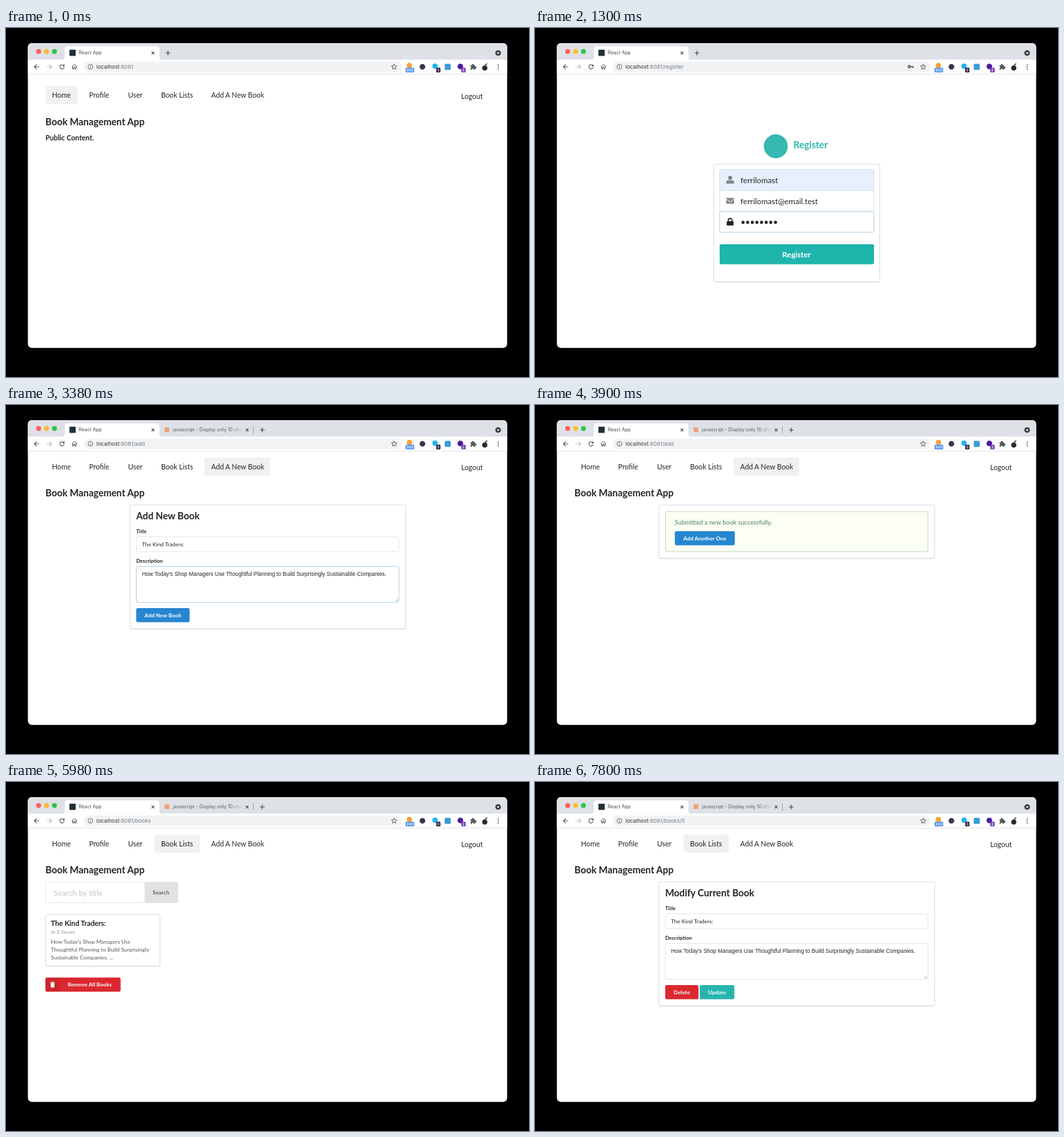
Write an HTML page that moves like this. It is 796x531 px and loops after 8000 ms.

```html
<!DOCTYPE html>
<html lang="en">
<head>
<meta charset="utf-8">
<title>Book Management App</title>
<style>
html, body { margin: 0; height: 100%; overflow: hidden; background: #000; }
svg { display: block; width: 796px; height: 531px; }
text { white-space: pre; }
</style>
</head>
<body>
<svg id="stage" viewBox="0 0 796 531"></svg>
<script>
const STEP = 1300, LOOP = 8000;
const INK = '#232425', TEAL = '#1fb5ad', BLUE = '#2786d0', RED = '#db2830', LINE = '#dededf', FOCUS = '#9cc3de';
const LATO = 'Lato, sans-serif', UI = 'Inter, sans-serif', ARIAL = 'Liberation Sans, Arial, sans-serif';

const USER = 'ferrilomast', MAIL = USER + '@email.test', BOOK = 'The Kind Traders:';
const BLURB = ["How Today's Shop Managers Use", 'Thoughtful Planning to Build Surprisingly', 'Sustainable Companies.'];

// y is the middle of the capital letters
const text = (x, y, str, size, { fill = INK, bold = 400, font = LATO, anchor = 'start' } = {}) =>
  `<text x="${x}" y="${y + size * .36}" font-size="${size}" fill="${fill}" font-weight="${bold}" font-family="${font}" text-anchor="${anchor}">${str}</text>`;
const bold = (x, y, str, size, fill = INK) => text(x, y, str, size, { fill, bold: 700 });
const ui = (x, y, str, size, fill = '#45494d') => text(x, y, str, size, { fill, font: UI });
const box = (x, y, w, h, fill, r = 0, stroke = 'none') =>
  `<rect x="${x}" y="${y}" width="${w}" height="${h}" rx="${r}" fill="${fill}" stroke="${stroke}" stroke-width=".8"/>`;
const dot = (x, y, r, fill) => `<circle cx="${x}" cy="${y}" r="${r}" fill="${fill}"/>`;
const line = (x, y, d, color = '#505357', width = 1.1) =>
  `<path transform="translate(${x} ${y})" d="${d}" fill="none" stroke="${color}" stroke-width="${width}"/>`;
const solid = (x, y, d, color) => `<path transform="translate(${x} ${y})" d="${d}" fill="${color}" fill-rule="evenodd"/>`;
const panel = (x, y, w, h) =>
  box(x - .4, y + .6, w + .8, h + 1, '#0001', 3) + box(x, y, w, h, '#fff', 2.4, '#d4d4d5');
const button = (x, y, w, label, fill) => box(x, y, w, 21.6, fill, 2.4) +
  text(x + w / 2, y + 10.8, label, 8.4, { fill: '#fff', bold: 700, anchor: 'middle' });

const CROSS = 'M-2 -2L2 2M2 -2L-2 2', PLUS = 'M-3.6 0H3.6M0 -3.6V3.6';
const TRASH = 'M-3.4 -4H-1.2L-.7 -4.6H.7L1.2 -4H3.4V-3H-3.4ZM-3 -2.4H3L2.6 4.4H-2.6Z';

function badge(x, y, w, str, fill) {
  return box(x - w / 2, y - 3.5, w, 7, fill, 1.2) +
    text(x, y, str, 5.4, { fill: '#fff', bold: 600, font: UI, anchor: 'middle' });
}

function browser(path, twoTabs, hasKey) {
  const star = Array.from({ length: 10 }, (_, i) => {
    const r = i % 2 ? 1.9 : 4.3, a = i * Math.PI / 5;
    return (r * Math.sin(a)).toFixed(2) + ' ' + (-r * Math.cos(a)).toFixed(2);
  }).join('L');
  let s = box(33, 23, 730, 25.5, '#dee1e6') + box(33, 48, 730, 22, '#fff') + box(33, 69.7, 730, .8, '#d9dbde');
  s += dot(49.7, 35.8, 3.7, '#fe5f57') + dot(61.7, 35.8, 3.7, '#febc2e') + dot(73.7, 35.8, 3.7, '#28c840');
  s += solid(0, 0, 'M85 48.5Q89.500 48.500 89.500 44V32.500Q89.500 28 94 28H229Q233.500 28 233.500 32.500V44Q233.500 48.500 238 48.500Z', '#fff');
  s += box(96.500, 33, 9.600, 9.600, '#20303a', 1) + ui(110.700, 37.900, 'React App', 7.200) + line(223.700, 38, CROSS);
  if (twoTabs) {
    s += box(241.500, 34, 7, 7, '#f0a073') + ui(254, 37.900, 'javascript - Display only 10 cha', 7.200, 'url(#fade)') +
      line(367, 38, CROSS) + box(376, 32.500, .8, 11, '#8d9196');
  }
  s += line(twoTabs ? 390 : 246.500, 38, PLUS, '#45494d', 1.200);
  s += dot(749, 38, 4.300, '#3d4043') + solid(749, 38.300, 'M-2 -1.200H2L0 1.600Z', '#fff');

  const arrow = 'M3.800 0H-3.400M0 -3.600L-3.600 0L0 3.600';
  s += line(46.800, 59, arrow) + `<g transform="translate(132.600 0) scale(-1 1)">${line(66.600, 59, arrow, '#bcbfc3')}</g>`;
  s += line(85.300, 59, 'M2.600 -2A3.300 3.300 0 1 0 3.200 .900') + solid(85.300, 59, 'M3.800 -4V-.4H.2Z', '#505357');
  s += line(104.200, 59, 'M-4 .2L0 -3.600L4 .2M-2.700 -.6V3.400H-.9V.7H.9V3.400H2.700V-.6', '#505357', 1);
  s += box(118, 51, 484, 16.400, '#f1f3f4', 8.200);
  s += line(128.500, 59, 'M-3.700 0A3.700 3.700 0 1 0 3.700 0A3.700 3.700 0 1 0 -3.700 0M0 -2.100V-1M0 -.4V2.200', '#5f6368', .9);
  s += `<text x="137.700" y="61.900" font-size="8.200" font-family="${UI}" fill="#777b80"><tspan fill="#303336">localhost</tspan>:8081${path}</text>`;
  if (hasKey) s += dot(569.700, 58.800, 2.500, '#505357') + dot(569.700, 58.800, .9, '#fff') + solid(572, 58.800, 'M0 -.8H4.200V2H2.600V.8H0Z', '#505357');
  s += line(590.800, 59.200, `M${star}Z`, '#505357', .9);

  s += dot(614, 57, 4, '#f6a13a') + badge(614.700, 64, 13, '999', '#4a8df0');
  s += dot(633.800, 59, 4.300, '#343a4d');
  s += dot(653, 58, 4, '#1fb5ec') + badge(658, 64, 6.400, '0', '#2b1038');
  s += box(667.700, 54.500, 9.200, 9.200, '#3c9bd8', 1.500);
  s += dot(691.500, 58.500, 4.300, '#4a1c9c') + badge(696.300, 64, 6.800, '2', '#7a3bb5');
  s += solid(711, 59.300, 'M-4 -2.600H-1.700A1.500 1.500 0 1 1 1.100 -2.600H3V-.6A1.500 1.500 0 1 1 3 2.200V4.200H.9A1.400 1.400 0 0 0 -1.900 4.200H-4V2.100A1.400 1.400 0 0 0 -4 -.6Z', '#55585c');
  s += dot(728.700, 60.800, 3.900, '#292929') + line(729.500, 58, 'M0 0Q.5 -3.500 3 -3.500', '#444', 1.500);
  for (const y of [55.800, 59, 62.200]) s += dot(749.200, y, .9, '#505357');
  return s;
}

function header(active, dy = 0) {
  const items = [['Home', 60, 49], ['Profile', 116.500, 51.500], ['User', 175.800, 42.500], ['Book Lists', 226, 69], ['Add A New Book', 302.200, 99.700]];
  return items.map(([label, x, w]) =>
    (label === active ? box(x, 79.900 + dy, w, 27.600, '#f1f1f1', 2.400) : '') + text(x + 10, 93.900 + dy, label, 10.800)).join('') +
    text(692.800, 95.600 + dy, 'Logout', 10.800) + bold(60, 134.200 + dy, 'Book Management App', 14.400);
}

function bookForm(title, border, buttons) {
  return panel(188.700, 152, 419.500, 188.500) + bold(198.200, 169.300, title, 14.400) +
    bold(198.200, 192, 'Title', 7.800) + box(198.400, 200.600, 399.600, 22.500, '#fff', 2.400, LINE) + text(207, 211.800, BOOK, 8.400) +
    bold(198.200, 237, 'Description', 7.800) + box(198.400, 245.600, 399.600, 54.800, '#fff', 2.400, border) +
    text(207, 257.400, BLURB.join(' '), 8.400, { font: ARIAL }) +
    line(596.600, 299, 'M-4 0L0 -4M-1.800 0L0 -1.800', '#8a8a8a', .7) + buttons;
}

function register() {
  const field = (y, fill, border) => box(281, y, 234.800, 31.600, fill, 2.400, border);
  let s = dot(366.500, 180, 18.200, '#35b9b1') + bold(393.200, 177.400, 'Register', 14.400, '#2cb7af');
  s += panel(272, 207.200, 252.700, 178.800);
  s += field(215.500, '#e8f0fd', '#c9d6e6') + field(247.300, '#fff', LINE) + field(279.200, '#fff', FOCUS);
  s += dot(297, 227.900, 3.100, '#858789') + solid(297, 231, 'M-6 5.800V3.600Q-6 .8 -3 .8H3Q6 .8 6 3.600V5.800Z', '#858789');
  s += box(291, 258.500, 12, 9, '#858789', 1.300) + line(297, 263, 'M-6 -2.600L0 1.600L6 -2.600', '#fff', 1);
  s += box(291.800, 294, 10.400, 6.600, INK, 1.200) + line(297, 294.500, 'M-2.700 0V-2.200A2.700 2.700 0 0 1 2.700 -2.200V0', INK, 1.700);
  s += text(312.800, 231.300, USER, 12) + text(312.800, 263.300, MAIL, 12);
  for (let i = 0; i < 8; i++) s += dot(316.600 + i * 7.050, 295.700, 2.450, INK);
  return s + box(281, 329, 235, 30.500, TEAL, 2.400) +
    text(398, 344.800, 'Register', 12, { fill: '#fff', bold: 700, anchor: 'middle' });
}

function gear(x, y, r) {
  return dot(x, y, r, '#3b3c3d') +
    `<circle cx="${x}" cy="${y}" r="${r}" fill="none" stroke="#3b3c3d" stroke-width="1.200" stroke-dasharray="${r * Math.PI / 8}"/>` +
    dot(x, y, r * .4, '#c0c1c2');
}

function bookList(hover) {
  const top = hover ? 199.500 : 201.700, footer = hover ? 332.400 : 297.500;
  let s = box(60.400, 152.200, 151, 31.500, '#fff', 2.400, LINE) + text(72.300, 168.400, 'Search by title', 12, { fill: '#c4c5c6' }) +
    box(211, 151.900, 51.200, 32, hover ? '#dcdddd' : '#e0e1e3', 2.400) + bold(223.300, 168, 'Search', 8.400, '#616263');
  s += panel(60, top, 174.400, hover ? 113.500 : 78.300) + bold(68.300, top + 13, BOOK, 10.800) +
    text(68.300, top + 26.200, 'in 2 hours', 8.400, { fill: '#9a9b9c' });
  [BLURB[0], BLURB[1], BLURB[2] + ' ...'].forEach((row, i) =>
    s += text(68.300, top + 41.600 + i * 11.600, row, 8.400, { fill: '#565758' }));
  if (hover) {
    s += box(60.400, 277.800, 173.600, .7, '#e9e9e9') + dot(79.300, 295.800, 10.800, '#c0c1c2') +
      gear(78, 295.800, 2.900) + gear(82.700, 293.600, 1.600) + gear(82.700, 298, 1.600);
    s += box(33, 473.500, 88, 14, '#dee1e6', 2) + ui(36.600, 480.300, 'localhost:8081/books/5', 7);
  }
  return s + box(60, footer, 114.500, 21.600, RED, 2.400) + box(60, footer, 21.600, 21.600, '#0001', 2.400) +
    solid(70.800, footer + 10.900, TRASH, '#fff') + bold(94, footer + 10.800, 'Remove All Books', 8.400, '#fff');
}

const scenes = [
  browser('') + header('Home', 8.400) + bold(60, 167, 'Public Content.', 10.800),
  browser('/register', false, true) + register(),
  browser('/add', true) + header('Add A New Book') +
    bookForm('Add New Book', FOCUS, button(198.200, 309, 81.300, 'Add New Book', BLUE)),
  browser('/add', true) + header('Add A New Book') + panel(188.700, 152, 419.500, 81) +
    box(198.700, 162.200, 399.300, 60.800, '#fcfff5', 2.400, '#b0cca2') +
    text(212.600, 178.200, 'Submitted a new book successfully.', 9.600, { fill: '#4f8350' }) +
    button(212.800, 191.900, 91.300, 'Add Another One', BLUE),
  browser('/books', true) + header('Book Lists') + bookList(false),
  browser('/books', true) + header('Book Lists') + bookList(true),
  browser('/books/5', true) + header('Book Lists') + bookForm('Modify Current Book', LINE,
    button(198.200, 309, 50.600, 'Delete', RED) + button(250.700, 309, 52.700, 'Update', '#26b5ae')),
];

document.getElementById('stage').innerHTML = `<defs>
  <clipPath id="window"><rect x="33.300" y="23" width="729.400" height="463.800" rx="6"/></clipPath>
  <linearGradient id="fade" gradientUnits="userSpaceOnUse" x1="342" x2="361"><stop stop-color="#555a5e"/><stop offset="1" stop-color="#555a5e" stop-opacity="0"/></linearGradient>
</defs><g clip-path="url(#window)">${box(33, 23, 730, 464, '#fff')}${scenes.map(s => `<g class="scene">${s}</g>`).join('')}</g>`;

const groups = document.querySelectorAll('.scene');
const start = performance.now();
function draw() {
  const current = Math.floor((performance.now() - start) % LOOP / STEP);
  groups.forEach((g, i) => g.style.display = i === current ? '' : 'none');
  requestAnimationFrame(draw);
}
draw();
</script>
</body>
</html>
```
